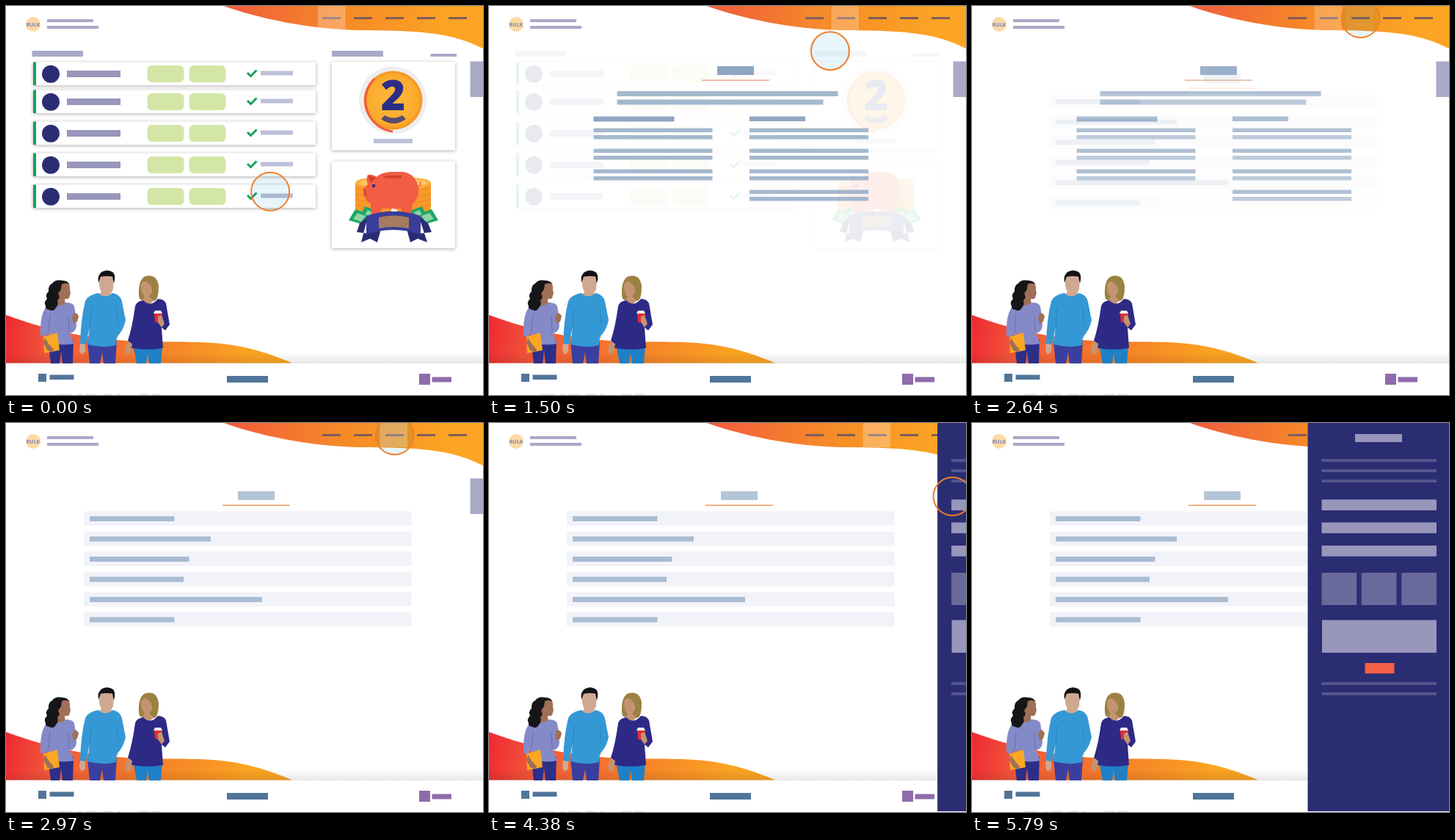
Animation, 650 px wide and 530 px high, one loop 5.82 s. Source, as an HTML page:

```html
<!DOCTYPE html>
<html lang="en">
<head>
<meta charset="utf-8">
<title>Site tour</title>
<style>
html, body { margin: 0; width: 100%; height: 100%; overflow: hidden; background: #fff; }
svg { display: block; width: 650px; height: 530px; }
.card { fill: #fff; filter: drop-shadow(0 1px 2.5px rgba(0,0,0,.32)); }
text { font-family: "Open Sans", "Noto Sans", sans-serif; text-anchor: middle; }
</style>
</head>
<body>
<svg viewBox="0 0 650 530">
  <defs>
    <linearGradient id="top" gradientUnits="userSpaceOnUse" x1="310" y1="0" x2="610" y2="40">
      <stop offset="0" stop-color="#f15e3b"/><stop offset=".5" stop-color="#f68a27"/><stop offset="1" stop-color="#fca524"/>
    </linearGradient>
    <linearGradient id="low" gradientUnits="userSpaceOnUse" x1="0" y1="430" x2="330" y2="480">
      <stop offset="0" stop-color="#ee2a32"/><stop offset=".2" stop-color="#f2593b"/>
      <stop offset=".6" stop-color="#f67f28"/><stop offset="1" stop-color="#fba322"/>
    </linearGradient>
    <linearGradient id="shade" x2="0" y2="1">
      <stop offset="0" stop-opacity="0"/><stop offset="1" stop-opacity=".16"/>
    </linearGradient>
    <radialGradient id="gold">
      <stop offset="0" stop-color="#fdb93c"/><stop offset=".85" stop-color="#fbab2d"/><stop offset="1" stop-color="#f59122"/>
    </radialGradient>
  </defs>

  <path fill="url(#top)" d="M297 0C345 17 410 31 480 33C560 33.500 605 35 650 58V0Z"/>
  <circle cx="37" cy="25" r="10" fill="#fdd9a5"/>
  <text x="37" y="27.500" font-size="7" font-weight="700" fill="#7f82b4">RULK</text>
  <g id="head"></g>

  <g id="page1">
    <g id="rows"></g>
    <rect class="card" x="444" y="76" width="168" height="120.500"/>
    <rect class="card" x="444" y="211.500" width="168" height="118.500"/>
    <circle cx="527" cy="128.500" r="46" fill="#eeeeef"/>
    <circle cx="527.500" cy="128.500" r="40" fill="url(#gold)"/>
    <path d="M502 99A42.500 42.500 0 0 0 527 171" fill="none" stroke="#f15b40" stroke-width="3"/>
    <text x="527.500" y="142" font-size="57" font-weight="800" fill="#2b2d87">2</text>
    <path fill="#5b4b6d" d="M516 149Q528 156 540 149L545 154Q528 166 511 154Z"/>
    <g id="coins"></g>
    <g fill="#19a866">
      <path d="M467 292L476 277L496 284L488 298Z"/><path d="M483 287L489 273L508 280L502 296Z"/>
      <path d="M589 292L580 277L560 284L568 298Z"/><path d="M573 287L567 273L548 280L554 296Z"/>
    </g>
    <path fill="#8fd3a5" d="M473 290L479 282L490 286L484 294ZM583 290L577 282L566 286L572 294ZM489 284L493 278L500 281L497 287ZM567 284L563 278L556 281L559 287Z"/>
    <path fill="#f15d45" d="M487 248L493 243Q490 236 493 230Q500 229 505 233Q512 226 526 226H541Q558 228 562 248Q563 262 554 270L552 284H540L538 276H512L510 284H498L497 269Q491 266 489 260Z"/>
    <path fill="none" stroke="#f15d45" stroke-width="1.500" d="M560 245Q567 246 564 239"/>
    <path fill="#d93d2c" d="M493 231L505 234L497 241ZM517 231H539V234.500H515ZM487 249L490 250L491 259L488 258Z"/>
    <circle cx="501" cy="245" r="2.200" fill="#2b2d87"/>
    <path fill="#2b2d73" d="M492 291L484 322L496 317L506 322L512 300ZM564 291L574 322L561 317L551 322L545 300ZM482 296L493 287V310L478 308ZM575 296L564 287V310L580 308Z"/>
    <path fill="#3a3d99" d="M491 286Q528 273 565 286V311Q528 299 491 311Z"/>
    <path fill="#a57c60" d="M508 288Q528 283 549 288V303Q528 299 508 303Z"/>
    <rect x="525" y="277" width="8" height="3" fill="#fff"/>
  </g>
  <g id="page2"></g>
  <g id="page3"></g>

  <path fill="url(#low)" d="M0 421C60 443 120 456 200 457.500C290 457 325 459 390 486.500H0Z"/>
  <rect y="472" width="650" height="15" fill="url(#shade)" opacity=".6"/>

  <g id="woman1">
    <path fill="#2b2f88" d="M57 455H92L91 487H77L75 470L73 487H61Z"/>
    <path fill="#a06f57" d="M73 382Q75 376 84 377Q88 381 87 387L88 391L86 398Q83 400 80 399L81 408H67Z"/>
    <path fill="#848ac7" d="M65 406Q75 411 81 404Q91 404 93 409L95 421L96 436Q95 444 87 446L93 460Q75 464 56 457L58 443L53 452L47 449Q46 422 54 411Q58 407 65 406Z"/>
    <path fill="none" stroke="#686fae" d="M85 422L86 444M60 420L58 444"/>
    <path fill="#a06f57" d="M92 419Q97 417 99 423L97 430L92 433L90 425Z"/>
    <path fill="#161618" d="M87 380Q84 374 77 374Q67 372 63 378Q57 381 58 389Q53 393 56 399Q51 403 54 409Q53 413 59 414Q65 417 68 411Q72 407 70 401Q75 397 71 392L75 386L76 379Q83 376 87 380Z"/>
    <path fill="#fba724" d="M51 451L70 445L73 469L52 473Z"/>
    <path fill="#a06f57" d="M53 452L58 460L65 468L63 472L56 469L51 459Z"/>
  </g>
  <g id="man">
    <path fill="#3a3f9f" d="M111 457H151L149 487H133L131 472L128 487H114Z"/>
    <path fill="#d0a892" d="M127 371Q137 362 147 372L146 386Q142 392 143 396Q135 400 126 395L130 389Q126 384 127 371ZM101 460H108L108 471L103 475L100 469ZM139 448L148 444L153 451L145 459L138 457Z"/>
    <path fill="#3498d5" d="M126 391Q135 400 145 391Q156 393 158 403L163 428Q160 442 151 451L146 447L152 437L150 462Q132 467 111 461L114 437L109 461L101 460Q102 426 108 402Q111 394 126 391Z"/>
    <path fill="none" stroke="#2883bd" d="M116 412L114 439M151 412L153 434"/>
    <path fill="#121316" d="M126 377Q124 366 131 362Q139 358 146 363Q150 368 147 378L145 369Q137 367 129 369Z"/>
  </g>
  <g id="woman2">
    <path fill="#1f80c6" d="M173 461H213L211 487H195L193 474L191 487H178Z"/>
    <path fill="#9c8142" d="M181 394Q180 371 191 368Q206 365 208 382Q208 397 204 401Q192 406 182 399Z"/>
    <path fill="#c49472" d="M184 379Q189 372 193 377Q200 382 199 390L195 396L201 401Q194 411 184 403L189 396Q184 392 184 379ZM166 456L173 459L169 473L164 475L162 468Z"/>
    <path fill="#2d2a86" d="M187 401Q197 411 207 399Q215 399 218 405L223 434L217 442L212 438L214 466Q194 470 171 466L175 445L173 461L166 456Q172 438 176 409Q178 402 187 401Z"/>
    <path fill="#e42b35" d="M202 419H213L212 431H203Z"/>
    <path fill="#f4eeee" d="M203 415H211L213 419H201Z"/>
    <path fill="#c49472" d="M207 423L212 421L216 433L212 438L207 431Z"/>
  </g>

  <g id="foot"></g>
  <circle id="lens" r="26" fill="#e8f5fb" style="mix-blend-mode:multiply"/>
  <g id="panel"></g>
  <circle id="ring" r="26" fill="none" stroke="#f07f28" stroke-width="2"/>
</svg>
<script>
const $ = id => document.getElementById(id);
const bar = (x, y, w, h, fill, extra = "") =>
  `<rect x="${x}" y="${y}" width="${w}" height="${h}" fill="${fill}" ${extra}/>`;
const add = (id, ...parts) => $(id).insertAdjacentHTML("beforeend", parts.flat().join(""));

const LILAC = "#a9a9c8", MAUVE = "#9896bb", NAVY = "#2b2d73", GREEN = "#17a05f", STEEL = "#51759a", PLUM = "#8f6bab";

add("head",
  bar(56, 18, 63, 4, LILAC), bar(56, 27, 70, 4, LILAC),
  [0, 1, 2, 3, 4].map(i => bar(431 + 43 * i, 15, 25, 3, "#7f5d5b")),
  [425, 466.5, 509.5].map((x, i) => bar(x, 0, 37.5, 33, "#fff", `id="tab${i + 1}" fill-opacity=".26"`)),
  bar(632.5, 75.5, 17.5, 48.5, LILAC));

add("rows",
  bar(35.5, 61, 69.5, 8, LILAC), bar(444, 61, 70, 8, LILAC), bar(578.5, 65, 35.5, 4, LILAC),
  [92.5, 130.5, 173.5, 216.5, 259.5].map(y =>
    `<rect class="card" x="37" y="${y - 16}" width="385" height="31.5"/>` +
    bar(37, y - 16, 4, 31.5, GREEN) +
    `<circle cx="61" cy="${y + .3}" r="12" fill="${NAVY}"/>` +
    bar(83, y - 4.5, 73, 9, MAUVE) +
    [192.5, 249.5].map(x => bar(x, y - 11.5, 50, 23, "#d3e6a6", 'rx="6"')).join("") +
    `<path d="M329 ${y - 1.5}l4.500 4.500l8 -8" fill="none" stroke="${GREEN}" stroke-width="3"/>` +
    bar(347, y - 4, 44, 6, "#bcc0d9")));
add("page1", bar(501, 181, 53, 6, "#bcc0d9"));

add("coins", [476, 529].map(x =>
  bar(x, 241, 50, 42, "#f79a2b") +
  [0, 1, 2, 3, 4].map(i =>
    `<path d="M${x} ${247 + 8 * i}q25 10 50 0" fill="none" stroke="#ee8420"/>`).join("") +
  `<ellipse cx="${x + 25}" cy="241" rx="25" ry="7" fill="#fbb040"/>
   <ellipse cx="${x + 25}" cy="241" rx="19" ry="4.5" fill="#fcc567"/>`));

const pairs = (x, n) => Array.from({ length: n }, (_, i) =>
  bar(x, 166.5 + 28 * i, 162, 5.5, "#9bb1c9") + bar(x, 176 + 28 * i, 162, 5.5, "#9bb1c9"));
add("page2",
  bar(311, 82, 50, 12, "#829dbd"), bar(290, 100.5, 92, 1.3, "#ee9066"),
  bar(174.5, 116, 301, 7, "#9bb1c9"), bar(174.5, 127.5, 281, 7, "#9bb1c9"),
  bar(142.5, 150.5, 110, 7, "#829dbd"), bar(355, 150.5, 76, 6.5, "#829dbd"),
  pairs(142.5, 3), pairs(355, 4));

add("page3",
  bar(316, 93, 50, 12, "#b3c5d6"), bar(295, 111.5, 92, 1.3, "#f58a3c"),
  [115.5, 165, 135.5, 128, 235, 115.5].map((w, i) =>
    bar(106, 120.3 + 27.5 * i, 446.5, 19.5, "#f2f3f9") + bar(114, 127 + 27.5 * i, w, 7, "#a9bcd1")));

add("foot",
  bar(0, 487, 650, 43, "#fff"), bar(44, 501, 11, 11, STEEL),
  bar(59.5, 502.5, 33, 6.5, STEEL), bar(301, 504, 56, 9, STEEL),
  bar(563, 501, 15, 15, PLUM), bar(580.5, 505.5, 26.5, 7, PLUM),
  [[70, 19], [98, 5], [108, 14], [132, 13], [152, 4], [181, 13], [198, 13]]
    .map(([x, w]) => bar(x, 529, w, 1, "#d8d8d8")));

add("panel",
  bar(0, 0, 193, 529, NAVY), bar(64.5, 15, 64, 11, MAUVE),
  [49, 63, 77, 353, 367].map(y => bar(19, y, 156.5, 4, "#54558c")),
  [104.3, 135.5, 167].map(y => bar(19, y, 156.5, 14.7, MAUVE)),
  [19, 73.3, 127.8].map(x => bar(x, 204, 47.7, 44, "#6a699b")),
  bar(19.5, 268.5, 156, 44.5, MAUVE), bar(78, 327, 40, 14.3, "#f45f45"));

// Pointer moves: start, end, then the four x and y values of a cubic curve
const moves = [
  [0, 1060, [360, 406, 448.5, 487.5], [253, 175, 96, 17]],
  [1280, 2580, [487.5, 413, 534, 529.5], [17, 140, 30, 17]],
  [3368, 4200, [529.5, 521, 577, 631.5], [17, 50, 90, 100]]
];
const LOOP = 5820;
const ramp = (t, from, to) => Math.min(1, Math.max(0, (t - from) / (to - from)));
const cubic = ([a, b, c, d], s) => {
  const r = 1 - s;
  return a * r * r * r + 3 * b * r * r * s + 3 * c * r * s * s + d * s * s * s;
};

function draw(t) {
  const [from, to, xs, ys] = moves.findLast(m => t >= m[0]);
  const s = ramp(t, from, to);
  const place = `translate(${cubic(xs, s)} ${cubic(ys, s)})`;
  const fade = 1 - ramp(t, 4420, 4740);
  for (const id of ["lens", "ring"]) {
    $(id).setAttribute("transform", place);
    $(id).style.opacity = fade;
  }
  const second = ramp(t, 1230, 1530), third = ramp(t, 2580, 2880);
  [1 - second, second * (1 - third), third].forEach((o, i) => {
    $("page" + (i + 1)).style.opacity = $("tab" + (i + 1)).style.opacity = o;
  });
  $("panel").setAttribute("transform", `translate(${650 - 192.5 * ramp(t, 4290, 4740)} 0)`);
}

const begin = performance.now();
function tick() {
  draw((performance.now() - begin) % LOOP);
  requestAnimationFrame(tick);
}
draw(0);
requestAnimationFrame(tick);
</script>
</body>
</html>
```
